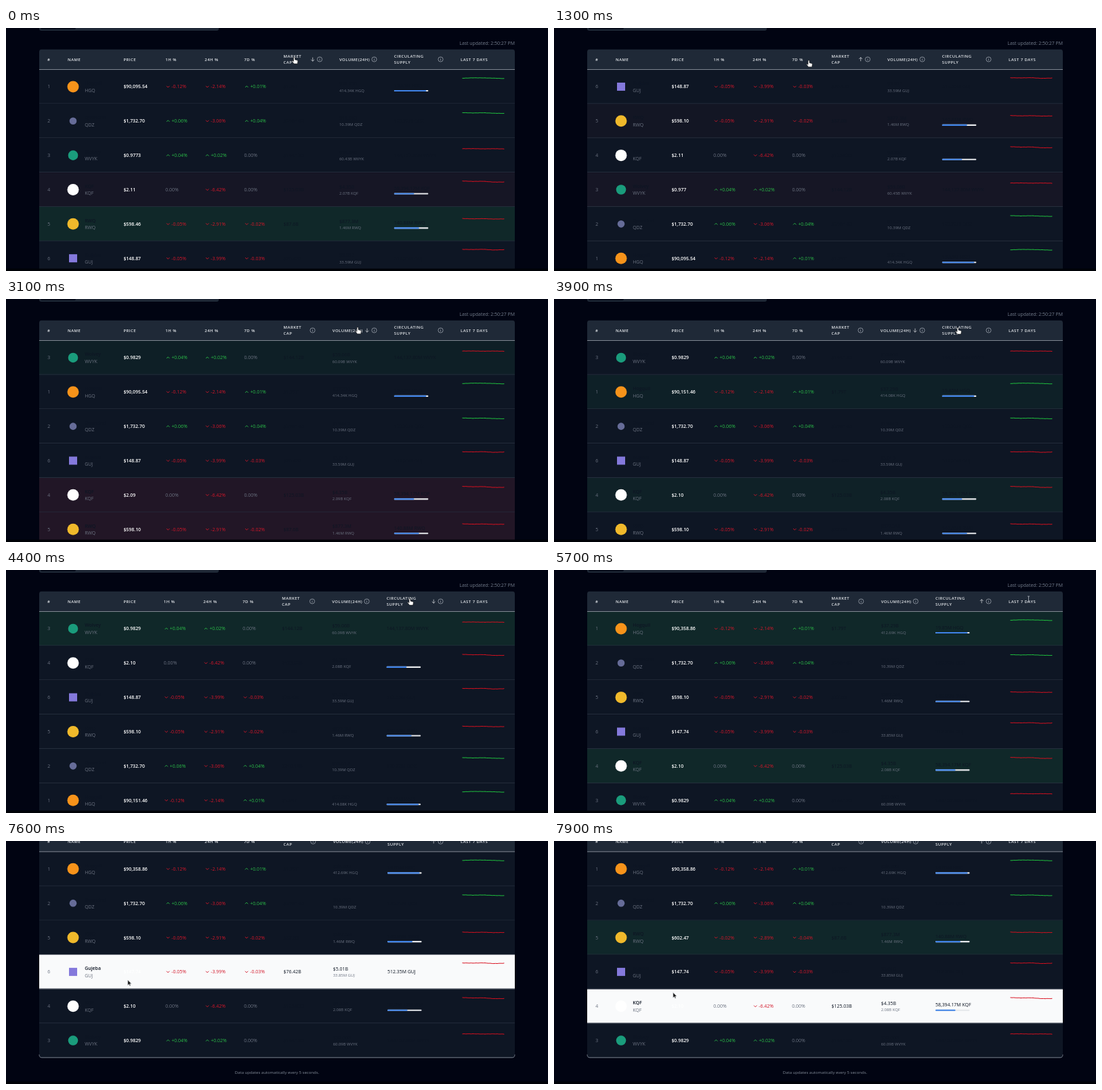
An HTML page for the animation above (8000 ms loop, 800x360 px).

```html
<!DOCTYPE html>
<html lang="en">
<head>
<meta charset="utf-8">
<title>Coin table</title>
<style>
  html, body { margin: 0; width: 100%; height: 100%; overflow: hidden; background: #010412; }
  svg { display: block; width: 800px; height: 360px; font: 6.95px "Open Sans", "Noto Sans", sans-serif; }
  text { white-space: pre; }
  .head { font-size: 6px; font-weight: 600; letter-spacing: .45px; fill: #e3e6ea; }
  .icon { fill: none; stroke: #aab1bb; stroke-width: .7; }
  .bold { font-weight: 600; }
  .price { font-weight: 600; fill: #fff; }
  .muted { fill: #6b7280; }
  .small { font-size: 5.9px; }
  .ink { fill: #0e1624; }
  .up { fill: #2bbd48; stroke: #2bbd48; }
  .down { fill: #d3172a; stroke: #d3172a; }
  text.up, text.down { stroke: none; }
  path.up, path.down { fill: none; stroke-width: .9; }
</style>
</head>
<body>
<svg viewBox="0 0 800 360">
  <g id="page">
    <rect x="49" y="-20" width="265" height="24" rx="3" fill="#1f2937"/>
    <rect x="51" y="-18" width="52" height="20" rx="2" fill="#050a18"/>
    <text x="751" y="25.2" text-anchor="end" fill="#747d8c">Last updated: 2:50:27 PM</text>
    <clipPath id="frame"><rect x="49" y="31.5" width="702" height="335.1" rx="4"/></clipPath>
    <g clip-path="url(#frame)">
      <rect x="49" y="31.5" width="702" height="30" fill="#1f2937"/>
      <g id="rows"></g>
      <rect x="49" y="61" width="702" height=".9" fill="#8d949e"/>
    </g>
    <path d="M49 362q0 4.5 4 4.5H747q4 0 4-4.5" fill="none" stroke="#7b838f" stroke-width=".9"/>
    <g id="header"></g>
    <text class="muted" x="400" y="390.6" text-anchor="middle" style="font-size:6px;fill:#858d9a">Data updates automatically every 5 seconds.</text>
  </g>
  <rect y="356.5" width="800" height="4" fill="#000207"/>
  <g id="pointer">
    <path id="hand" d="M-1 0q1-1 2 0V3.4l3.4.9q1 .3.9 1.4L4.7 9.500H-.4L-3.200 5.900q-.2-1.200 1.100-.8L-1 6Z" fill="#fff" stroke="#111" stroke-width=".6"/>
    <path id="beam" d="M-1.600-4H1.600M0-4V4M-1.600 4H1.600" fill="none" stroke-width=".8"/>
    <path id="arrow" d="M0 0V7.600L1.800 6L3 8.600L4.200 8L3 5.500H5.400Z" fill="#111" stroke="#d5d8dd" stroke-width=".6"/>
  </g>
</svg>
<script>
const LOOP = 8000, TOP = 61.5, PITCH = 50.85, SCROLL = 45.6;
const $ = id => document.getElementById(id);

// frac: filled part of the supply bar; line: sparkline heights from the row centre
const coins = {
  a: { rank: 1, sym: 'HGQ', name: 'Hogquil', size: 8.5, color: '#f7931a', pct: [-.12, -2.14, .01],
       cap: '$1.79T', vol: '$37.29B', supply: '19.85M', frac: .94, line: [-12.5, -13.1, -13, -12.6, -12] },
  b: { rank: 2, sym: 'QDZ', name: 'Quandrel', size: 5.3, color: '#666c98', pct: [.06, -3.06, .04],
       cap: '$210.14B', vol: '$18.01B', supply: '120.72M', line: [-12.4, -11.9, -12.2, -11.5, -11.2] },
  c: { rank: 3, sym: 'WVYK', name: 'Wolvey', size: 7.3, color: '#1a9c7c', pct: [.04, .02, 0],
       cap: '$144.12B', vol: '$59.06B', supply: '144,137.80M', line: [-9.8, -9.9, -9.6, -9.8, -9.5] },
  d: { rank: 4, sym: 'KQF', name: 'KQF', size: 8.5, color: '#fff', pct: [0, -6.42, 0],
       cap: '$125.03B', vol: '$4.35B', supply: '58,394.17M', frac: .585, line: [-12.8, -12.2, -12.4, -11.2, -11.3] },
  e: { rank: 5, sym: 'RWQ', name: 'RWQ', size: 8.5, color: '#f0b92b', pct: [-.05, -2.91, -.02],
       cap: '$87.6B', vol: '$877.3M', supply: '140.88M', frac: .73, line: [-8.1, -7.6, -7.9, -7.3, -7.5] },
  f: { rank: 6, sym: 'GUJ', name: 'Gujeba', size: 6, square: true, color: '#8479dc', pct: [-.05, -3.99, -.03],
       cap: '$76.42B', vol: '$5.01B', supply: '512.35M', line: [-13.2, -13, -13.3, -12.3, -12.8] }
};

// time, coin, direction of flash, price, traded units, changed percentages
const ticks = [
  [-9000, 'a', 0, '90,095.54', '414.34K'], [-9000, 'b', 0, '1,732.70', '10.39M'],
  [-9000, 'c', 0, '0.9773', '60.43B'], [-9000, 'f', 0, '148.87', '33.59M'],
  [-700, 'd', -1, '2.11', '2.07B'], [-150, 'e', 1, '598.46', '1.46M'],
  [450, 'e', -1, '598.10', '1.46M'], [600, 'c', -1, '0.977', '60.45B'],
  [2500, 'c', 1, '0.9829', '60.09B'], [2850, 'd', -1, '2.09', '2.09B'],
  [2900, 'e', -1, '598.10', '1.46M'], [3350, 'a', 1, '90,151.46', '414.08K'],
  [3400, 'd', 1, '2.10', '2.08B'], [4250, 'c', 1, '0.9829', '60.09B'],
  [4650, 'f', -1, '147.74', '33.85M'], [5520, 'a', 1, '90,358.86', '412.69K'],
  [5540, 'd', 1, '2.10', '2.08B'], [6750, 'f', -1, '147.74', '33.85M'],
  [7700, 'e', 1, '602.47', '1.46M', [-.02, -2.89, -.04]]
];

// cols: 1h, 24h, 7d, cap, volume, supply; info: icon positions; arrow: x and direction
const sorts = [
  { at: 0, order: 'abcdef', cols: [235.3, 293.3, 351.4, 409.5, 492, 572.8], info: [463, 543.5, 641.5], arrow: [452.7, 1] },
  { at: 550, order: 'fedcba', cols: [235.3, 293.3, 351.4, 409.5, 492, 572.8], info: [463, 543.5, 641.5], arrow: [452.7, -1] },
  { at: 2650, order: 'cabfde', cols: [235.3, 293.3, 351.4, 409.5, 481.8, 572.8], info: [452.5, 543.5, 641.5], arrow: [533, 1] },
  { at: 4050, order: 'cdfeba', cols: [232.8, 291.2, 349.2, 407.3, 481.2, 561.7], info: [452, 532.5, 641.5], arrow: [631.2, 1] },
  { at: 4850, order: 'abefdc', cols: [235.3, 293.3, 351.2, 409.5, 482.7, 563], info: [453.3, 533.8, 641.5], arrow: [631.2, -1] }
];

// pointer: time, x, y
const path = [
  [0, 425.5, 43.5], [900, 425.5, 43.5], [1300, 376, 48.2], [1800, 376, 48.2], [2500, 519, 42.2], [3300, 519, 42.2],
  [3900, 596, 42.6], [5000, 596, 42.6], [5500, 700.5, 43], [5950, 700.5, 43],
  [6700, 193.5, 142], [7150, 193.5, 142], [7800, 175.8, 224.6], [8000, 175.8, 224.6]
];

const ease = p => p * p * (3 - 2 * p);
const clamp = p => Math.min(1, Math.max(0, p));
const text = (x, y, s, cls) => `<text x="${x}" y="${y}" class="${cls}">${s}</text>`;

function percent(x, v) {
  const s = Math.abs(v).toFixed(2) + '%';
  if (!v) return text(x, 2.5, s, 'muted');
  const cls = v > 0 ? 'up' : 'down', dir = v > 0 ? -1 : 1;
  return `<path class="${cls}" d="M${x + 1.7} ${-1.1 * dir}l2.2 ${2.2 * dir}l2.2 ${-2.2 * dir}"/>` +
    text(x + 9, 2.5, (v > 0 ? '+' : '-') + s, cls);
}

function sparkline(line, rising) {
  const pts = [];
  for (let i = 0; i <= 24; i++) {
    const k = Math.min(3, Math.floor(i / 6)), p = i / 6 - k;
    const y = line[k] + (line[k + 1] - line[k]) * p + .15 * Math.sin(i * 2.3 + line[0]);
    pts.push((673.5 + i * 2.58).toFixed(1) + ',' + y.toFixed(2));
  }
  return `<polyline points="${pts.join(' ')}" fill="none" stroke="${rising ? '#20c53f' : '#d9101f'}" stroke-width="1"/>`;
}

function logo(c) {
  const r = c.size;
  return c.square
    ? `<rect x="${99 - r}" y="${-r}" width="${2 * r}" height="${2 * r}" fill="${c.color}"/>`
    : `<circle cx="99" r="${r}" fill="${c.color}"/>`;
}

function rowMarkup(c, tick, cols) {
  const [, , , price, units, pct = c.pct] = tick;
  const [, , , cap, vol, sup] = cols;
  const bar = c.frac
    ? `<rect x="${sup}" y="5" width="50.500" height="2.100" rx="1" fill="#e5e7eb"/>
       <rect x="${sup}" y="5" width="${50.5 * c.frac}" height="2.100" rx="1" fill="#3f82e6"/>` : '';
  return text(61.3, 2.5, c.rank, 'muted') + logo(c) +
    text(116.2, -2.6, c.name, 'ink bold') + text(116.2, 7.8, c.sym, 'muted') +
    text(173.4, 2.5, '$' + price, 'price') +
    pct.map((v, i) => percent(cols[i], v)).join('') +
    text(cap, 2.5, c.cap, 'ink') +
    text(vol, -1.8, c.vol, 'ink') + text(vol, 7.6, units + ' ' + c.sym, 'muted small') +
    text(sup, c.frac ? .6 : 2.5, c.supply + ' ' + c.sym, 'ink') + bar +
    sparkline(c.line, c.rank < 3);
}

function headerMarkup({ cols, info, arrow: [ax, dir] }) {
  const label = (x, ...lines) => lines.map((s, i) =>
    text(x, lines.length > 1 ? 44.4 + i * 8.2 : 48.6, s, 'head')).join('');
  const icon = x => `<circle class="icon" cx="${x}" cy="46.400" r="3.600"/>
    <path class="icon" d="M${x} 46v2.200M${x} 44.300v.8"/>`;
  return label(61, '#') + label(91, 'NAME') + label(173.4, 'PRICE') +
    label(cols[0], '1H %') + label(cols[1], '24H %') + label(cols[2], '7D %') +
    label(cols[3], 'MARKET', 'CAP') + label(cols[4], 'VOLUME(24H)') +
    label(cols[5], 'CIRCULATING', 'SUPPLY') + label(671, 'LAST 7 DAYS') +
    info.map(icon).join('') +
    `<path class="icon" style="stroke:#e3e6ea" d="M${ax} ${46.4 - 2.8 * dir}v${5.6 * dir}m-2.400 ${-2.4 * dir}l2.400 ${2.4 * dir}l2.400 ${-2.4 * dir}"/>`;
}

const rows = Object.keys(coins).map(id => {
  const g = document.createElementNS('http://www.w3.org/2000/svg', 'g');
  g.innerHTML = `<rect x="49" y="${-PITCH / 2}" width="702" height="${PITCH}"/>
    <rect x="49" y="${-PITCH / 2}" width="702" height="${PITCH}"/>
    <rect x="49" y="${PITCH / 2 - .8}" width="702" height=".8" fill="#2b3443"/><g></g>`;
  $('rows').append(g);
  const [base, flash, , body] = g.children;
  return { id, g, base, flash, body };
});

function pointerAt(t) {
  const i = path.findIndex(p => p[0] > t);
  const [t0, x0, y0] = path[i - 1], [t1, x1, y1] = path[i];
  const p = ease((t - t0) / (t1 - t0));
  return [x0 + (x1 - x0) * p, y0 + (y1 - y0) * p];
}

let shownSort;
function render(t) {
  const sort = sorts.filter(s => s.at <= t).pop();
  const scroll = SCROLL * ease(clamp((t - 7120) / 380));
  const [px, py] = pointerAt(t);
  const hover = Math.floor((py + scroll - TOP) / PITCH);

  $('page').setAttribute('transform', `translate(0 ${-scroll})`);
  if (sort !== shownSort) $('header').innerHTML = headerMarkup(sort);

  for (const row of rows) {
    const place = sort.order.indexOf(row.id);
    const tick = ticks.filter(k => k[1] === row.id && k[0] <= t).pop();
    if (sort !== shownSort || tick !== row.tick) {
      row.body.innerHTML = rowMarkup(coins[row.id], tick, sort.cols);
      row.tick = tick;
    }
    const lit = place === hover;
    const glow = lit ? 0 : .12 * (1 - clamp((t - tick[0]) / 1000));
    row.g.setAttribute('transform', `translate(0 ${TOP + PITCH * (place + .5)})`);
    row.base.setAttribute('fill', lit ? '#f9fafb' : '#0e1624');
    row.flash.setAttribute('fill', tick[2] > 0 ? '#22c55e' : '#dc1e3c');
    row.flash.setAttribute('opacity', tick[2] ? glow : 0);
  }
  shownSort = sort;

  const offset = py + scroll - TOP - PITCH * (hover + .5);
  const kind = hover < 0 ? (px < 662 ? 'hand' : 'beam') : Math.abs(offset) < 6 ? 'beam' : 'arrow';
  for (const id of ['hand', 'beam', 'arrow']) $(id).style.display = id === kind ? '' : 'none';
  $('beam').setAttribute('stroke', hover < 0 ? '#aeb4bd' : '#333');
  $('pointer').setAttribute('transform', `translate(${px} ${py})`);
}

const start = performance.now();
function step() {
  render((performance.now() - start) % LOOP);
  requestAnimationFrame(step);
}
step();
</script>
</body>
</html>
```
